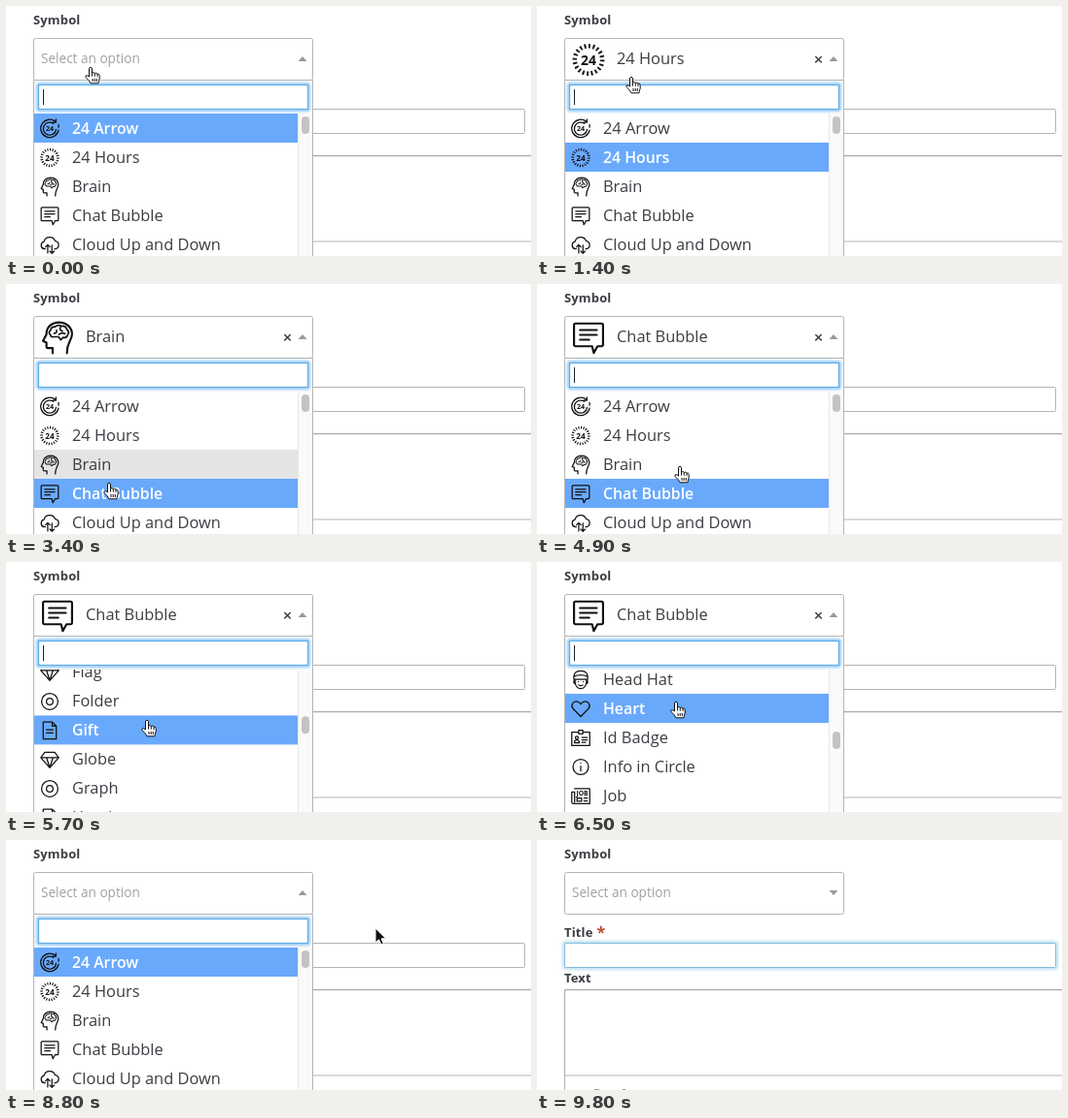
Write an HTML page that moves like this. It is 540 px wide and 258 px high and loops after 9.9 s.

```html
<!DOCTYPE html>
<html lang="en">
<head>
<meta charset="utf-8">
<title>Symbol picker</title>
<style>
  html, body { margin: 0; width: 100%; height: 100%; overflow: hidden; background: #fff; }
  svg { display: block; }
  text { font-family: "Open Sans", "Noto Sans", sans-serif; fill: #3a3d42; }
  .label { font-size: 13px; font-weight: 700; letter-spacing: .15px; }
  .item { font-size: 16.4px; }
  .row.on .item { font-size: 15.8px; font-weight: 600; fill: #fff; }
  .bar { fill: none; }
  .row.picked .bar { fill: #e4e4e4; }
  .row.on .bar { fill: #69a9fc; }
  .hint { font-size: 13.6px; fill: #a0a0a0; }
  .box { fill: #fff; stroke: #b4b4b4; }
  .icon { fill: none; stroke: #111; stroke-width: 1.5; stroke-linejoin: round; stroke-linecap: round; }
  .icon text { fill: #111; stroke: none; font-weight: 700; text-anchor: middle; }
</style>
</head>
<body>
<svg width="540" height="258" viewBox="0 0 540 258">
  <defs>
    <clipPath id="view"><rect x="29" y="111" width="271" height="147"/></clipPath>
    <filter id="soft" x="-10%" y="-60%" width="120%" height="220%"><feGaussianBlur stdDeviation="1.6"/></filter>
  </defs>

  <text class="label" x="28" y="19">Symbol</text>
  <text class="label" x="28" y="100">Title</text>
  <text x="61.5" y="101" font-size="16" font-weight="700" style="fill:#c0442f">*</text>
  <text class="label" x="28" y="147">Text</text>

  <rect id="glow" x="28" y="106" width="506" height="26" rx="2" fill="none" stroke="#8cc8ea" stroke-width="4" filter="url(#soft)"/>
  <rect id="title" class="box" x="28.5" y="106.5" width="505" height="25" rx="1"/>
  <path d="M545 154.5H28.5V243" fill="none" stroke="#a9a9a9"/>
  <path d="M29 155.5H540" stroke="#ececec"/>
  <path d="M28.5 258V243H545" fill="none" stroke="#b4b4b4"/>
  <path d="M59 257.5h5M88 257.5h3" stroke="#999"/>

  <rect class="box" x="28.5" y="33.5" width="287" height="43" rx="2"/>
  <text id="hint" class="hint" x="36" y="59.3">Select an option</text>
  <g id="value">
    <g id="bigIcon"></g>
    <text id="name" class="item" x="82" y="60"></text>
    <path d="M286.3 52l6.4 6.4M292.7 52l-6.4 6.4" stroke="#444" stroke-width="1.5"/>
  </g>
  <path id="arrow" fill="#999"/>

  <g id="drop">
    <path class="box" d="M28.5 260V76.5H315.5V260"/>
    <rect x="32.5" y="80.5" width="279" height="27" rx="2" fill="none" stroke="#8ec6f5" stroke-width="3" filter="url(#soft)"/>
    <rect x="33.5" y="81.5" width="277" height="25" fill="#fff" stroke="#62aee8" stroke-width="1.3"/>
    <path id="caret" d="M38.5 86v16" stroke="#222"/>
    <g clip-path="url(#view)"><g id="list"></g></g>
    <rect x="300" y="111" width="15" height="147" fill="#fafafa"/>
    <path d="M300.5 111V258" stroke="#e8e8e8"/>
    <rect id="thumb" x="304" width="8" height="18" rx="4" fill="#c3c3c3"/>
  </g>

  <g id="cursor" stroke-linejoin="round">
    <path id="hand" fill="#fff" stroke="#111" d="M-1.5 1.2Q0-.9 1.5 1.2V6.2Q3 4.8 4.3 6.4Q6 5.3 7 7.2Q9 6.4 9.2 8.7V12Q8.3 14 8 16.8H0Q-1 14-5 10.6Q-5.5 8-3.2 8.8L-1.5 10ZM1.5 6.2V9.5M4.3 6.4V9.7M7 7.2V9.9M2 12v3M4.2 12v3M6.3 12v3"/>
    <path id="beam" fill="none" stroke="#222" d="M-3 1Q0 1 0 3V15Q0 17-3 17M3 1Q0 1 0 3M0 15Q0 17 3 17"/>
    <path id="pointer" fill="#111" stroke="#fff" d="M0 0V15L3.5 11.8L6 17L8.3 16L6 10.8H10.6Z"/>
  </g>
</svg>

<script>
const $ = id => document.getElementById(id);
const path = d => `<path d="${d}"/>`;
const word = (s, y, size) => `<text x="12" y="${y}" font-size="${size}">${s}</text>`;

// Icons live in a 24 x 24 box.
const icons = {
  arrow24: path("M19 3.4A11 11 0 1 0 22.8 14M19.6.6V4.4H15.6M16.5 5.8A7.8 7.8 0 1 0 18.5 16.3M22.8 10.5V7M16 19A8 8 0 0 0 19.8 13") + word("24", 15, 8.5),
  hours: '<circle cx="12" cy="12" r="10" stroke-width="3.2" stroke-linecap="butt" pathLength="20" stroke-dasharray=".42 .58"/>' + word("24", 15.6, 9.8),
  brain: path("M8.5 23.2V19.5H5Q3.8 19.5 4 18V15.5L1.5 14.3L4 9.5C3.8 4 8 .8 13.2.8C18.5.8 22.5 4.6 22.5 9.4C22.5 14 18.5 15.5 18.8 23.2") +
    '<g stroke-width="1.2">' + path("M7 10Q4.8 8.2 7 6.4Q7.5 3.8 10.3 4Q12.5 2 15 3.6Q18 3 18.6 5.8Q21 7.5 19.3 10Q18.6 12.4 16 11.8L14.3 13.5L12.8 11.3H9Q7 11.6 7 10M9.5 8.8Q11.5 9 11.3 6.6M14 4.5Q13.4 6.8 15.5 7.2M13 9.6Q15 8 17.4 9") + "</g>",
  chat: path("M2.6 1.6H21.4Q22.5 1.6 22.5 2.7V17Q22.5 18.2 21.4 18.2H18.5L15.8 23L14.6 18.2H2.6Q1.5 18.2 1.5 17V2.7Q1.5 1.6 2.6 1.6M5.8 6.4H18M5.8 9.9H18M5.8 13.4H12.5"),
  cloud: path("M6.5 17H5.5A4.6 4.6 0 0 1 5 8A7.2 7.2 0 0 1 18.7 7.5A4.8 4.8 0 0 1 18.8 17H18M9.5 22V12M6.8 14.6L9.5 11.8L12.2 14.6M14.7 12.5V22.5M12 19.8L14.7 22.6L17.4 19.8"),
  hat: path("M3.5 11.5Q2.5 1 12 1T20.5 11.5ZM3.5 8Q12 4.5 20.5 8M5 11.5V15Q6 22.8 12 22.8T19 15V11.5M9 14.5h.2M15 14.5h.2M9.5 18.5Q12 20 14.5 18.5M5 13Q2.5 13 4 16.5M19 13Q21.5 13 20 16.5"),
  heart: path("M12 21.5L3 12.3C-1.2 7.5 3 2.6 6.8 2.8Q10 3 12 6.3Q14 3 17.2 2.8C21 2.6 25.2 7.5 21 12.3Z"),
  badge: path("M9.5 5H1V21.5H23V5H14.5M9.5 2.5H14.5V7H9.5ZM4.2 18Q4.2 14.5 7.2 14.5T10.2 18ZM13.5 11.5H20M13.5 14.5H20M13.5 17.5H18") + '<circle cx="7.2" cy="11.8" r="1.8"/>',
  info: '<circle cx="12" cy="12" r="9.5"/>' + path("M12 11V17M12 7.4v.2"),
  job: path("M4.5 3H23V21.5H3Q1 21.5 1 19.5V7H4.5V19.5M7.5 14.5H13V18.5H7.5ZM16 14.5H20M16 18H20") + '<text x="13.8" y="11.4" font-size="8">JOB</text>',
  sheet: path("M4 1.5H15L20 6.5V22.5H4ZM15 1.5V6.5H20M8 11H16M8 15H16"),
  ring: '<circle cx="12" cy="12" r="10"/><circle cx="12" cy="12" r="4"/>',
  gem: path("M6 3H18L23 9.5L12 22L1 9.5ZM1 9.5H23M8 9.5L12 22L16 9.5")
};
const spare = ["ring", "sheet", "gem"];
const fillers = "Coffee,Cog,Compass,Credit Card,Diamond,Document,Download,Earth,Envelope,Eye,Factory,Flag,Folder,Gift,Globe,Graph,Hand"
  .split(",").map((name, i) => [name, spare[i % 3]]);
const items = [
  ["24 Arrow", "arrow24"], ["24 Hours", "hours"], ["Brain", "brain"],
  ["Chat Bubble", "chat"], ["Cloud Up and Down", "cloud"],
  ...fillers,
  ["Head Hat", "hat"], ["Heart", "heart"], ["Id Badge", "badge"],
  ["Info in Circle", "info"], ["Job", "job"], ["Key", "ring"], ["Label", "sheet"]
];
const ROW = 30, TOP = 111, LOOP = 9900, SCROLL = 665;
const HEART = items.findIndex(([name]) => name === "Heart");

const icon = (key, cx, cy, k) =>
  `<g class="icon" transform="translate(${cx - 12 * k} ${cy - 12 * k}) scale(${k})">${icons[key]}</g>`;

$("list").innerHTML = items.map(([name, key], i) => {
  const y = TOP + i * ROW;
  return `<g class="row"><rect class="bar" x="29" y="${y}" width="271" height="${ROW}"/>` +
    icon(key, 45, y + 15.5, .84) + `<text class="item" x="68" y="${y + 21}">${name}</text></g>`;
}).join("");
const rows = [...$("list").children];

// Fingertip stops: time, x, y
const stops = [
  [0, 87, 63], [200, 88, 88], [500, 95, 146], [700, 96, 150], [800, 96, 142], [1100, 95, 62], [1200, 95, 60],
  [1400, 97, 73], [1900, 98, 178], [2100, 98, 182], [2200, 98, 172], [2600, 98, 64], [2800, 99, 60],
  [3000, 101, 85], [3400, 106, 205], [3700, 107, 209], [4000, 118, 120], [4100, 118, 120], [4400, 130, 60],
  [4500, 132, 60], [4900, 147, 188], [5200, 146, 180], [6000, 145, 152], [6100, 145, 152], [6500, 143, 144],
  [6800, 144, 147], [7100, 152, 120], [7700, 270, 62], [8000, 288, 55], [8300, 288, 55],
  [8700, 360, 84], [9100, 440, 110], [9300, 442, 112], [9400, 455, 228], [9900, 455, 228]
];
// Open spells: start, end, time from which hovering counts
const spells = [[0, 700, 0], [1200, 2100, 1200], [2800, 3700, 2800], [4500, 6800, 5000], [8200, 9200, 8200]];
// Picks: time, item
const picks = [[0, -1], [700, 1], [2100, 2], [3700, 3], [6800, HEART], [8200, -1]];

const show = (id, on) => $(id).style.display = on ? "" : "none";
const ease = p => p * p * (3 - 2 * p);

function place(t) {
  const i = stops.findIndex(s => s[0] > t);
  const [t0, x0, y0] = stops[i - 1], [t1, x1, y1] = stops[i];
  const p = (t - t0) / (t1 - t0);
  return [x0 + (x1 - x0) * p, y0 + (y1 - y0) * p];
}

function cursorKind(x, y, open) {
  const inside = x > 28 && x < 316;
  if (inside && y > 33 && y < 77) return "hand";
  if (open && inside) return y > 81 && y < 107 ? "beam" : "hand";
  const field = x > 28 && x < 534 && y > 106 && y < 132;
  return field || y > 154 ? "beam" : "pointer";
}

let shown;
function draw(t) {
  const [x, y] = place(t);
  const spell = spells.find(s => t >= s[0] && t < s[1]);
  const pick = picks.filter(p => p[0] <= t).pop()[1];

  if (pick !== shown) {
    shown = pick;
    show("hint", pick < 0);
    show("value", pick >= 0);
    if (pick >= 0) {
      $("name").textContent = items[pick][0];
      $("bigIcon").innerHTML = icon(items[pick][1], 53, 55.5, 1.42);
    }
  }
  $("arrow").setAttribute("d", spell ? "M300.5 57H309.5L305 52Z" : "M300.5 52H309.5L305 57Z");

  show("drop", spell);
  if (spell) {
    const scroll = spell[0] === 4500 ? SCROLL * ease(Math.min(1, Math.max(0, (t - 5100) / 900))) : 0;
    const hover = y >= TOP && x < 300 && t >= spell[2];
    const lit = hover ? Math.floor((y - TOP + scroll) / ROW) : Math.max(0, pick);
    rows.forEach((row, i) => {
      row.classList.toggle("on", i === lit);
      row.classList.toggle("picked", i === pick);
    });
    $("list").setAttribute("transform", `translate(0 ${-scroll})`);
    $("thumb").setAttribute("y", 114 + 61 * scroll / SCROLL);
    show("caret", (t - spell[0]) % 1000 < 500);
  }

  const focus = t >= 9400;
  $("glow").style.opacity = !focus ? 0 : t < 9500 ? .4 : t < 9800 ? .85 : .55;
  $("title").style.stroke = focus ? "#86bbd8" : "";

  show("cursor", t < 9500);
  $("cursor").setAttribute("transform", `translate(${Math.round(x)} ${Math.round(y)})`);
  const kind = cursorKind(x, y, spell);
  for (const id of ["hand", "beam", "pointer"]) show(id, id === kind);
}

const start = performance.now();
function tick() {
  const t = (performance.now() - start) % LOOP;
  draw(Math.floor(t / 100) * 100);
  requestAnimationFrame(tick);
}
tick();
</script>
</body>
</html>
```
